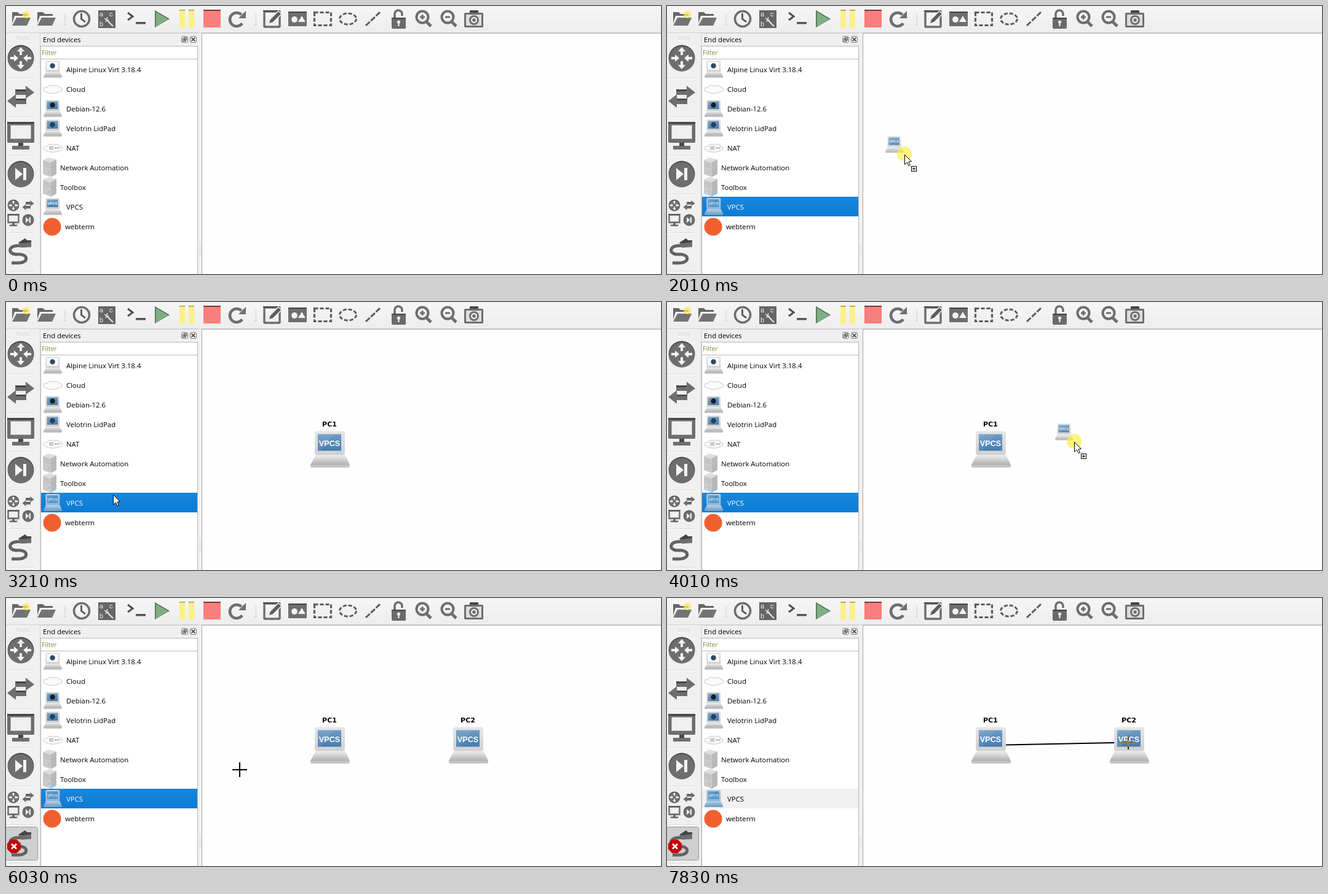
An HTML page with a canvas that plays this animation: 1065x437 px, repeating every 8000 ms.

```html
<!DOCTYPE html>
<html lang="en">
<head>
<meta charset="utf-8">
<title>Network lab</title>
<style>
html, body { margin: 0; width: 100%; height: 100%; overflow: hidden; background: #fff; }
canvas { display: block; width: 1065px; height: 437px; }
</style>
</head>
<body>
<canvas id="stage"></canvas>
<script>
const W = 1065, H = 437, LOOP = 8000;
const cv = document.getElementById('stage'), c = cv.getContext('2d');
const dpr = window.devicePixelRatio || 1;
cv.width = W * dpr;
cv.height = H * dpr;

const GRAY = '#6e6e6e', DARK = '#454545', PANEL = '#f0f0f0', EDGE = '#b8b8b8';
const UI = '"Open Sans", "Noto Sans", sans-serif';
const BOLD = '"DejaVu Sans", sans-serif';
const ARIAL = '"Liberation Sans", Arial, sans-serif';

// ---- drawing helpers ----
function rect(x, y, w, h, fill) { c.fillStyle = fill; c.fillRect(x, y, w, h); }
function frame(x, y, w, h, col) { c.strokeStyle = col; c.lineWidth = 1; c.strokeRect(x + .5, y + .5, w - 1, h - 1); }
function round(x, y, w, h, r, fill) { c.beginPath(); c.roundRect(x, y, w, h, r); c.fillStyle = fill; c.fill(); }
function disc(x, y, r, fill) { c.beginPath(); c.arc(x, y, r, 0, 7); c.fillStyle = fill; c.fill(); }
function ring(x, y, r, w, col = GRAY) { c.beginPath(); c.arc(x, y, r, 0, 7); c.lineWidth = w; c.strokeStyle = col; c.stroke(); }
function trace(p) {
  c.beginPath();
  for (let i = 0; i < p.length; i += 2) c.lineTo(p[i], p[i + 1]);
}
function poly(p, fill = GRAY) { trace(p); c.closePath(); c.fillStyle = fill; c.fill(); }
function line(p, w, col = GRAY, dash = []) {
  trace(p); c.setLineDash(dash); c.lineWidth = w; c.strokeStyle = col; c.stroke(); c.setLineDash([]);
}
function text(s, x, y, size, col = '#000', font = UI, weight = '', align = 'left') {
  c.font = `${weight} ${size}px ${font}`; c.textAlign = align; c.fillStyle = col; c.fillText(s, x, y);
}
function ramp(y0, y1, a, b) {
  const g = c.createLinearGradient(0, y0, 0, y1);
  g.addColorStop(0, a); g.addColorStop(1, b);
  return g;
}
function at(x, y, s, draw) { c.save(); c.translate(x, y); c.scale(s, s); draw(); c.restore(); }

// ---- devices ----
function computer(x, y, s, o = {}) {
  at(x, y, s, () => {
    const t = o.tint;
    poly([9, 38, 56, 38, 64, 55, 63, 59, 1, 59, 0, 55], ramp(38, 57, t ? '#bcd6ea' : '#f4f4f4', t ? '#6b9cc4' : '#a8a8a8'));
    poly([0, 55, 64, 55, 63, 59, 1, 59], t ? '#79a5c8' : '#c2c2c2');
    round(7, 0, 49, 39, 4, ramp(0, 40, t ? '#b3d0e6' : '#e6e6e6', t ? '#8db6d6' : '#d0d0d0'));
    rect(12, 5, 38, 27, o.blank ? '#fcfcfc' : ramp(5, 32, t ? '#4d8cbf' : '#6d9cc6', t ? '#5c9ccc' : '#457cae'));
    if (!o.blank) poly([12, 5, 38, 5, 18, 32, 12, 32], 'rgba(255,255,255,.09)');
    if (o.logo) disc(31, 18, 9, o.logo);
    else text('VPCS', 31, 24, 12.6, t ? '#d5e7f4' : '#fff', ARIAL, 'bold', 'center');
  });
}
function cloud(x, y) {
  c.beginPath();
  c.moveTo(x + 4, y + 11);
  c.bezierCurveTo(x - 3, y + 9, x - 1, y + 3, x + 5, y + 4);
  c.bezierCurveTo(x + 8, y - 1, x + 14, y, x + 16, y + 2);
  c.bezierCurveTo(x + 21, y - 1, x + 26, y + 1, x + 26, y + 4);
  c.bezierCurveTo(x + 32, y + 4, x + 32, y + 11, x + 25, y + 11);
  c.bezierCurveTo(x + 20, y + 14, x + 9, y + 14, x + 4, y + 11);
  c.fillStyle = '#fbfbfb'; c.fill();
  c.lineWidth = .9; c.strokeStyle = '#bcbcbc'; c.stroke();
}
function server(x, y) {
  poly([x, y + 4, x + 9, y, x + 22, y + 3, x + 13, y + 8], '#dedede');
  poly([x, y + 4, x + 13, y + 8, x + 13, y + 32, x, y + 27], '#cacaca');
  poly([x + 13, y + 8, x + 22, y + 3, x + 22, y + 27, x + 13, y + 32], '#b9b9b9');
  line([x + 2, y + 9, x + 11, y + 12], 1, '#b0b0b0');
  line([x + 2, y + 13, x + 11, y + 16], 1, '#b0b0b0');
  disc(x + 9, y + 24, 1, '#a0a0a0');
}

// ---- side bar symbols, each centred on 0,0 ----
function puck() {
  disc(0, 0, 21.5, ramp(-21, 21, DARK, '#757575'));
  disc(0, 1, 20.5, GRAY);
}
function router() {
  puck();
  for (let i = 0; i < 4; i++) {
    c.save();
    c.rotate(i * Math.PI / 2);
    const out = i % 2 === 0;
    poly(out ? [0, -18, 6, -11, 2, -11, 2, -5, -2, -5, -2, -11, -6, -11]
             : [0, -4, 6, -11, 2, -11, 2, -17, -2, -17, -2, -11, -6, -11], '#f4f4f4');
    c.restore();
  }
}
function arrows() {
  poly([-9, -12, 8, -12, 8, -18, 22, -7, 8, 3, 8, -3, -9, -3]);
  rect(-9, -12, 17, 3, DARK);
  poly([9, 3, -8, 3, -8, -4, -22, 7, -8, 18, -8, 12, 9, 12]);
  rect(-8, 3, 17, 2.5, DARK);
}
function monitor() {
  round(-22, -22, 44, 34, 2, GRAY);
  rect(-22, -22, 44, 3, DARK);
  rect(-16.5, -16.5, 33, 22, '#f0f0f0');
  rect(-4, 12, 8, 6, DARK);
  rect(-14, 17, 28, 6, GRAY);
}
function skip() {
  puck();
  poly([-9, -10, 3, 0, -9, 10], '#f4f4f4');
  rect(4, -10, 5, 20, '#f4f4f4');
}
function cable(on) {
  if (on) {
    c.beginPath(); c.roundRect(-1.5, 373.5, 53, 54, 3);
    c.fillStyle = '#cfcfcf'; c.fill();
    c.lineWidth = 1; c.strokeStyle = '#9c9c9c'; c.stroke();
  }
  c.beginPath();
  c.moveTo(26, 391);
  c.bezierCurveTo(2, 388, 2, 405, 17, 405);
  c.bezierCurveTo(37, 403, 38, 419, 20, 419);
  c.lineTo(9, 419);
  c.lineWidth = 5; c.strokeStyle = '#636363'; c.stroke();
  poly([20, 386, 31, 379, 34, 382, 41, 382, 41, 393, 25, 394]);
  poly([20, 386, 31, 379, 34, 382, 41, 382, 41, 385, 27, 387], DARK);
  if (!on) return;
  const p = [];
  for (let i = 0; i < 8; i++) {
    const a = (i + .5) * Math.PI / 4;
    p.push(13 + 12 * Math.cos(a), 405 + 12 * Math.sin(a));
  }
  poly(p, '#c4000c');
  line([9, 401, 17, 409], 2.6, '#fff');
  line([17, 401, 9, 409], 2.6, '#fff');
}

// ---- tool bar ----
function folder(x) {
  poly([x, 10, x + 9, 10, x + 12, 13, x + 25, 13, x + 25, 18, x + 6, 18, x, 30], '#666');
  poly([x + 4, 16, x + 27, 16, x + 27, 19, x + 7, 19, x + 1, 31, x, 28], '#f1f1f1');
  poly([x + 7, 19, x + 30, 19, x + 24, 32, x, 32], '#747474');
}
function grip(x) {
  for (let y = 13; y < 31; y += 4) { rect(x, y, 2, 2, '#cecece'); rect(x + 3, y + 2, 1, 1, '#dadada'); }
}
function lens(x, plus) {
  line([x + 6, 25, x + 14, 33], 5);
  ring(x, 18, 9.5, 4);
  rect(x - 4, 16.5, 8, 3, GRAY);
  if (plus) rect(x - 1.5, 14, 3, 8, GRAY);
}
function toolbar() {
  rect(0, 0, W, 44, ramp(0, 44, '#f6f6f6', '#ededed'));
  rect(0, 43, W, 1, '#d4d4d4');
  folder(10); disc(33, 14, 6, 'rgba(255,232,90,.75)');
  folder(51);
  grip(95);
  ring(123, 21, 12.5, 3.6);
  line([122.5, 12, 122.5, 21, 129, 26], 2.8, '#555');
  rect(150, 7, 28, 29, '#666');
  text('a', 152, 17, 11, '#eee', ARIAL);
  text('c', 168, 17, 11, '#eee', ARIAL);
  text('b', 152, 33, 11, '#eee', ARIAL);
  line([163, 22, 174, 33], 2, '#eee');
  line([160, 20, 167, 24], 1.5, '#ddd');
  line([165, 18, 162, 26], 1.5, '#ddd');
  line([198, 11, 206, 17, 198, 23], 3.2, '#505050');
  rect(211, 26, 16, 3.5, '#555');
  poly([242, 7, 266, 21, 242, 35], '#4d6a50');
  poly([243.5, 9.5, 264, 21.5, 243.5, 34], '#80ad83');
  for (const x of [282, 297]) { rect(x, 7, 9, 29, '#fbf189'); rect(x, 6, 9, 1.5, '#a49c50'); }
  rect(321, 7, 28, 28, '#f87f7e'); rect(321, 6, 28, 2, '#6d3f3f');
  c.beginPath(); c.arc(375, 22, 11, .6, 5.5); c.lineWidth = 4.6; c.strokeStyle = GRAY; c.stroke();
  poly([390, 8, 390, 20, 378, 20]);
  grip(405);
  c.beginPath(); c.roundRect(420, 9, 25, 25, 1); c.lineWidth = 3.4; c.strokeStyle = GRAY; c.stroke();
  rect(418, 7, 28, 2, DARK);
  poly([428, 22, 443, 7, 449, 13, 434, 28, 426, 30], '#f1f1f1');
  poly([430, 22, 443, 9, 447, 13, 434, 26, 428, 28], '#5e5e5e');
  round(459, 9, 30, 24, 1, GRAY); rect(459, 9, 30, 2, DARK);
  disc(469, 22, 5, '#f2f2f2');
  poly([481, 16, 487, 26, 475, 26], '#f2f2f2');
  c.setLineDash([6, 3]);
  c.lineWidth = 3.2; c.strokeStyle = '#5c5c5c';
  c.strokeRect(501.5, 10.5, 27, 21);
  c.beginPath(); c.ellipse(556, 21, 13.5, 9, 0, 0, 7); c.lineWidth = 3; c.stroke();
  c.setLineDash([]);
  line([585, 32, 608, 10], 3, '#5c5c5c', [9, 2.5]);
  c.beginPath(); c.moveTo(632, 21); c.lineTo(632, 13); c.arc(638, 13, 6, Math.PI, 0); c.lineTo(644, 16);
  c.lineWidth = 3.6; c.strokeStyle = GRAY; c.stroke();
  round(627, 19, 23, 18, 2, '#6a6a6a');
  rect(627, 19, 23, 2, DARK);
  disc(638.5, 26, 2.6, '#f0f0f0'); rect(637.4, 27, 2.2, 6, '#f0f0f0');
  lens(677, true); lens(718, false);
  round(754, 7, 14, 6, 1, DARK);
  round(745, 11, 31, 24, 2, GRAY);
  rect(748, 14, 25, 18, '#dedede');
  disc(761, 23, 8, GRAY); disc(761, 23, 5, '#f0f0f0'); disc(761, 23, 2.8, GRAY);
}

function sidebar(on) {
  rect(0, 44, 55, H - 44, PANEL);
  for (let x = 17; x < 34; x += 4) { rect(x, 50, 2, 1, '#c2c2c2'); rect(x + 2, 53, 2, 1, '#c2c2c2'); }
  for (let i = 0; i < 6; i++) { const y = 117 + i * 63; rect(2, y, 44, 1, '#d8d8d8'); rect(2, y + 1, 44, 1, '#fff'); }
  const set = [router, arrows, monitor, skip];
  set.forEach((f, i) => at(24, 85 + 63 * i, 1, f));
  set.forEach((f, i) => at(12 + 24 * (i % 2), i < 2 ? 325 : 349, .44, f));
  cable(on);
}

// ---- device list ----
const DEVICES = [
  ['Alpine Linux Virt 3.18.4', 98, y => computer(61, y + 2, .47, { blank: true, logo: '#2a4d6b' })],
  ['Cloud', 98, y => cloud(61, y + 10)],
  ['Debian-12.6', 98, y => computer(61, y + 2, .47, { logo: '#1c1c1c' })],
  ['Velotrin LidPad', 98, y => computer(61, y + 2, .47, { logo: '#2b3f50' })],
  ['NAT', 98, y => {
    cloud(61, y + 10);
    for (const d of [14.5, 16.5, 18.5]) line([70, y + d, 77, y + d], .8, '#888');
    line([79, y + 16.5, 87, y + 16.5], 1, '#888');
  }],
  ['Network Automation', 88, y => server(60, y)],
  ['Toolbox', 88, y => server(60, y)],
  ['VPCS', 98, (y, tint) => computer(61, y + 2, .47, { tint })],
  ['webterm', 96, y => disc(75, y + 17, 14.5, '#f0602f')]
];
function dock(row) {
  rect(55, 44, 264, H - 44, PANEL);
  rect(55, 44, 257, 1, '#cfcfcf');
  rect(55, 44, 1, H, '#d4d4d4');
  text('End devices', 60, 59, 11.3);
  for (const x of [285, 299]) {
    c.beginPath(); c.roundRect(x + .5, 49.5, 10, 10, 2.5); c.lineWidth = 1; c.strokeStyle = '#7c7c7c'; c.stroke();
  }
  c.strokeStyle = '#444';
  c.strokeRect(289.5, 51.5, 4, 4); c.strokeRect(287.5, 53.5, 4, 4);
  line([301.5, 51.5, 307.5, 57.5], 1.5, '#333');
  line([307.5, 51.5, 301.5, 57.5], 1.5, '#333');
  rect(56, 65, 256, H, '#fff');
  frame(56, 65, 256, 22, EDGE);
  frame(56, 86, 256, H, EDGE);
  text('Filter', 58, 80, 10.5, '#7d8a3c');
  DEVICES.forEach(([name, x, icon], i) => {
    const y = 87 + 32 * i, mine = i === 7 && row;
    if (mine) rect(57, y, 254, 32, row === 'blue' ? ramp(y, y + 32, '#1a86d9', '#0b7bd6') : PANEL);
    icon(y, mine);
    text(name, x, y + 21, 11.4, mine && row === 'blue' ? '#fff' : '#000');
  });
  for (let y = 388; y < 406; y += 4) { rect(314, y, 1, 1, '#bbb'); rect(316, y + 2, 1, 1, '#bbb'); }
  rect(318, 44, W, H, '#fefefe');
  rect(318, 44, 1, H, '#a8a8a8');
  rect(318, 44, W, 1, '#b0b0b0');
}
function node(name, x) {
  computer(x, 210.5, 1);
  text(name, x + 31, 203, 11, '#000', BOLD, 'bold', 'center');
}
function popup(alpha, hot) {
  c.globalAlpha = alpha;
  rect(552, 251, 119, 2, '#b8b8b8');
  rect(669, 231, 2, 20, '#b8b8b8');
  rect(549, 228, 120, 23, '#f6f6f6');
  frame(549, 228, 120, 23, '#a0a0a0');
  if (hot) rect(551, 230, 116, 19, '#90c8f6');
  text('Ethernet0', 550, 244, 11.3);
  c.globalAlpha = 1;
}

// ---- pointer: a arrow, p pressed, d dragging, x cross, z cross pressed ----
function pointer(kind, x, y) {
  if (kind === 'd') { c.globalAlpha = .85; computer(x - 31, y - 30, .46); c.globalAlpha = 1; }
  if ('pdz'.includes(kind)) disc(x, y - 1, 12, 'rgba(250,240,70,.68)');
  if ('xz'.includes(kind)) {
    c.globalCompositeOperation = 'difference';
    rect(x - 12, y - 1, 24, 2, '#fff');
    rect(x - 1, y - 12, 2, 11, '#fff');
    rect(x - 1, y + 1, 2, 11, '#fff');
    c.globalCompositeOperation = 'source-over';
    return;
  }
  at(x + .5, y + .5, 1, () => {
    poly([0, 0, 0, 16, 4, 12.5, 6.5, 18, 9, 17, 6.5, 11.5, 11, 11], '#fff');
    c.lineWidth = 1; c.strokeStyle = '#000'; c.stroke();
  });
  if (kind === 'd') {
    rect(x + 11, y + 19, 9, 9, '#fff'); frame(x + 11, y + 19, 9, 9, '#000');
    rect(x + 13, y + 23, 5, 1, '#000'); rect(x + 15, y + 21, 1, 5, '#000');
  }
}
const PATH = `a724,402 a470,378 a180,338 a100,324 p87,322 p87,322 d247,292 d386,242 d428,222 d505,234
a525,236 a468,227 a300,275 a174,314 p119,320 d230,295 d483,240 d662,228 d735,230
a750,236 a750,236 a712,222 a627,259 a120,286 a24,394 p24,396 a60,372 x380,280 x608,235 x535,237 z523,234
a522,228 a590,236 x575,236 x615,225 x660,206 x750,235`.split(/\s+/)
  .map(s => [s[0], ...s.slice(1).split(',').map(Number)]);
const PICK = 4, PC1 = 10, PC2 = 19, LINK = 25, MENU = 31, WIRE = 33;
const start = n => 590 + 200 * n + (n >= 2 ? 20 : 0) + (n >= 23 ? 20 : 0);

function stepAt(t) {
  let n = -1;
  while (n + 1 < PATH.length && t >= start(n + 1)) n++;
  return n;
}
function draw(t) {
  const n = stepAt(t);
  c.setTransform(dpr, 0, 0, dpr, 0, 0);
  rect(0, 0, W, H, PANEL);
  dock(n >= MENU ? 'gray' : n >= PICK ? 'blue' : '');
  sidebar(n >= LINK);
  toolbar();
  if (n < 0) return;
  const [kind, x, y] = PATH[n];
  if (n >= WIRE) line([527, 240, x, y + .5], 2, '#000');
  if (n >= PC1) node('PC1', 495);
  if (n >= PC2) node('PC2', 720);
  if (n >= MENU && n < WIRE) popup(n === MENU ? .14 : 1, n > MENU);
  pointer(kind, x, y);
}
function tick(now) {
  draw(now % LOOP);
  requestAnimationFrame(tick);
}
draw(0);
requestAnimationFrame(tick);
</script>
</body>
</html>
```
